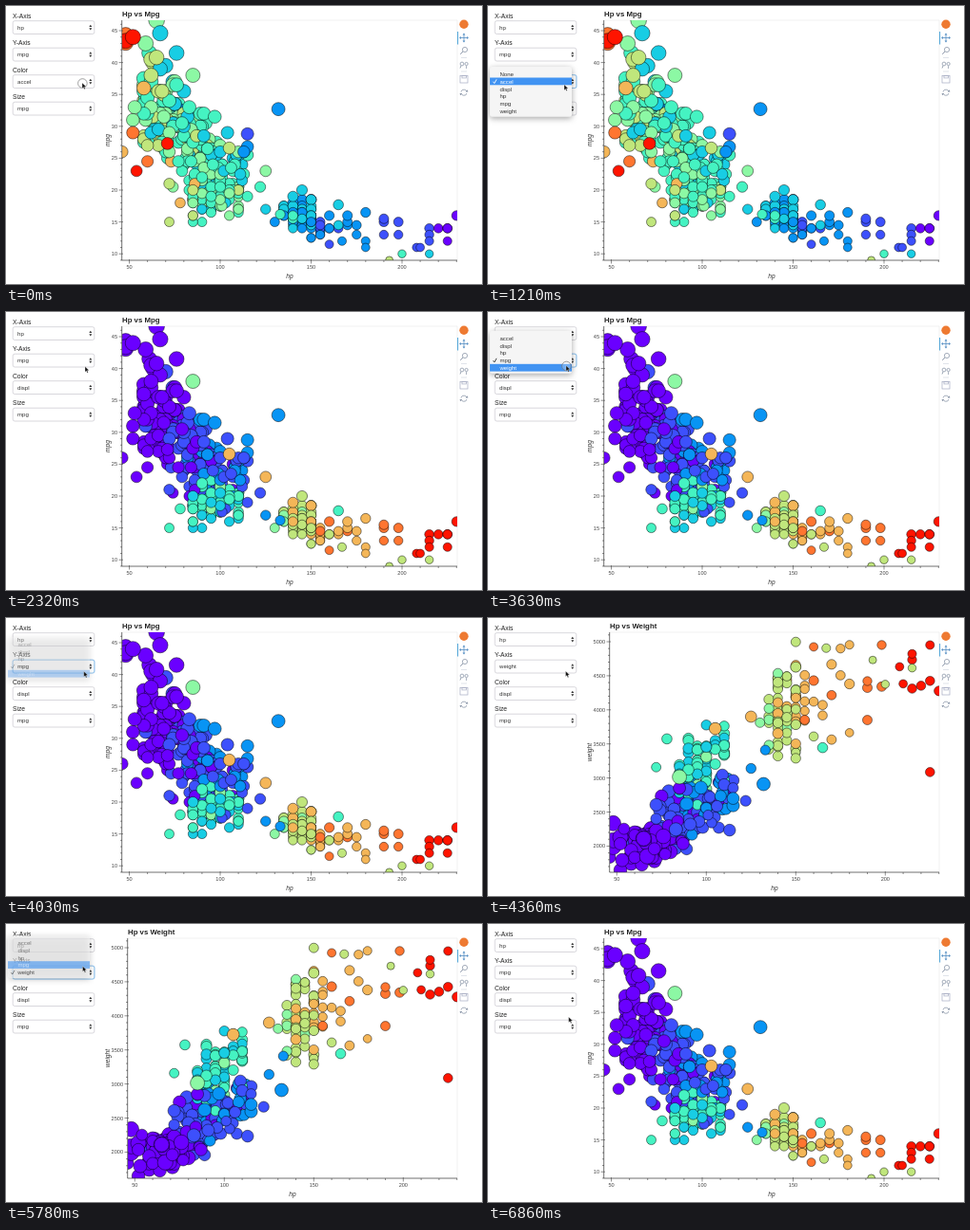
These frames come from a looping animation (500 px wide and 293 px high, 6.96 s). An HTML page with a canvas:

```html
<!DOCTYPE html>
<html lang="en">
<head>
<meta charset="utf-8">
<title>Scatter explorer</title>
<style>
html, body { margin: 0; width: 100%; height: 100%; overflow: hidden; background: #fff; }
canvas { display: block; width: 500px; height: 293px; }
</style>
</head>
<body>
<canvas id="stage"></canvas>
<script>
const W = 500, H = 293, LOOP = 6960;
const canvas = document.getElementById('stage');
const ratio = window.devicePixelRatio || 1;
canvas.width = W * ratio;
canvas.height = H * ratio;
const ctx = canvas.getContext('2d');
const SANS = '"Liberation Sans", Arial, sans-serif';
const FIELDS = ['accel', 'displ', 'hp', 'mpg', 'weight'];
const PALETTE = ['#6a00ff', '#3d50fc', '#0894f4', '#18cde4', '#45f3c2',
  '#8cf8a4', '#c0e67c', '#f4b658', '#ff7530', '#ff1400'];
const RANGE = { accel: [8, 24.8], displ: [68, 455] };
const clamp = (v, lo, hi) => Math.min(hi, Math.max(lo, v));

// ---- data ----
let seed = 20;
function random() {
  seed = (seed + 0x6d2b79f5) | 0;
  let n = Math.imul(seed ^ (seed >>> 15), 1 | seed);
  n = (n + Math.imul(n ^ (n >>> 7), 61 | n)) ^ n;
  return ((n ^ (n >>> 14)) >>> 0) / 4294967296;
}
const gauss = () => (random() + random() + random() - 1.5) * 2;

// Each measure is [mean, spread, slope per hp].
const clusters = [
  { n: 85, hp: [68, 6], lo: 58, hi: 80, step: 1, mpg: [32.5, 3.6, -.1], displ: [92, 9, .3], weight: [2040, 130, 8], accel: [17, 1.7, 0] },
  { n: 110, hp: [86, 8], lo: 70, hi: 105, step: 1, mpg: [27.5, 3.6, -.2], displ: [125, 18, .8], weight: [2420, 220, 12], accel: [16, 1.7, 0] },
  { n: 32, hp: [105, 9], lo: 90, hi: 122, step: 1, mpg: [23.5, 2.3, -.05], displ: [145, 19, 0], weight: [2700, 200, 8], accel: [14.5, 1.2, 0] },
  { n: 75, hp: [98, 9], lo: 85, hi: 110, step: 5, mpg: [19.3, 1.7, 0], displ: [235, 17, 0], weight: [3200, 240, 16], accel: [16.4, 1.4, 0] },
  { n: 66, hp: [145, 7], lo: 130, hi: 150, step: 5, mpg: [16, 1.5, -.08], displ: [322, 19, .8], weight: [3950, 310, 10], accel: [13, 1, 0] },
  { n: 14, hp: [165, 9], lo: 155, hi: 180, step: 5, mpg: [14, 1, 0], displ: [365, 20, 0], weight: [4250, 300, 0], accel: [11.5, .8, 0] }
];
// hp, mpg, displ, weight, accel
const loners = [
  [46, 26, 97, 1835, 20.5], [48, 43.1, 90, 1985, 21.5], [48, 44.3, 90, 2085, 21.7],
  [48, 43.4, 90, 2335, 23.7], [52, 44, 97, 2130, 24.6], [52, 31, 76, 1649, 16.5],
  [52, 29, 85, 2035, 22.2], [53, 33, 91, 1795, 17.4], [54, 23, 97, 2254, 23.5],
  [60, 24.5, 98, 2164, 22.1], [60, 27, 97, 1834, 19], [65, 46.6, 86, 2110, 17.9],
  [67, 44.6, 91, 1850, 13.8], [65, 40.8, 85, 2110, 19.2], [76, 41.5, 98, 2144, 14.7],
  [71, 27.3, 79, 1960, 24], [78, 18, 250, 3574, 21], [72, 15, 250, 3158, 19.5],
  [72, 21, 140, 2401, 19.5], [85, 38, 262, 3015, 17], [105, 26.6, 350, 3725, 19],
  [125, 23, 350, 3900, 17.4], [132, 32.7, 168, 2910, 11.4], [115, 28.8, 173, 2595, 11.3],
  [115, 26.8, 173, 2700, 12.9], [113, 26, 121, 2234, 12.5], [125, 17, 163, 3140, 13.6],
  [133, 16.2, 163, 3410, 15.8], [165, 17.7, 231, 3445, 13.4]
];
// hp, mpg, weight
const heavy = [
  [150, 15, 4997], [167, 12, 4906], [175, 13, 4900], [180, 12, 4955], [180, 11, 3664],
  [180, 16.5, 4380], [170, 15, 3563], [170, 16, 4668], [160, 14, 3609], [190, 15, 3850],
  [190, 15.5, 4325], [190, 13, 4422], [198, 15, 4341], [198, 13, 4952], [208, 11, 4633],
  [210, 11, 4382], [215, 14, 4312], [215, 13, 4735], [215, 12, 4821], [220, 14, 4354],
  [225, 14, 4425], [225, 14, 3086], [225, 12, 4951], [230, 16, 4278]
];

function makeCars() {
  const cars = [];
  for (const c of clusters) {
    for (let i = 0; i < c.n; i++) {
      const raw = clamp(c.hp[0] + gauss() * c.hp[1], c.lo, c.hi);
      const hp = Math.round(raw / c.step) * c.step;
      const value = ([mean, spread, slope]) => mean + gauss() * spread + slope * (hp - c.hp[0]);
      cars.push({
        hp, mpg: Math.round(value(c.mpg) * 2) / 2, displ: value(c.displ),
        weight: value(c.weight), accel: value(c.accel), order: random()
      });
    }
  }
  cars.sort((a, b) => a.order - b.order);
  for (const [hp, mpg, displ, weight, accel] of loners) cars.push({ hp, mpg, displ, weight, accel });
  for (const [hp, mpg, weight] of heavy) {
    cars.push({ hp, mpg, displ: hp * 2.02, weight, accel: 20.5 - hp * .05 });
  }
  // low-output giants
  cars.push({ hp: 193, mpg: 9, displ: 304, weight: 4732, accel: 18.5 });
  cars.push({ hp: 200, mpg: 10, displ: 307, weight: 4376, accel: 15 });
  cars.push({ hp: 215, mpg: 10, displ: 318, weight: 4615, accel: 14 });
  return cars;
}
const cars = makeCars();

function colorOf(car, field) {
  const [lo, hi] = RANGE[field];
  return PALETTE[clamp(Math.floor((car[field] - lo) / (hi - lo) * 10), 0, 9)];
}
const radiusOf = car => 4 + 4.3 * Math.pow(clamp((car.mpg - 9) / 37.6, 0, 1), .8);

// ---- drawing helpers ----
function text(str, x, y, size, color = '#333', align = 'left', style = '') {
  ctx.font = `${style} ${size}px ${SANS}`;
  ctx.textAlign = align;
  ctx.fillStyle = color;
  ctx.fillText(str, x, y);
}
function line(color, width, ...points) {
  ctx.beginPath();
  points.forEach(([x, y], i) => i ? ctx.lineTo(x, y) : ctx.moveTo(x, y));
  ctx.strokeStyle = color;
  ctx.lineWidth = width;
  ctx.stroke();
}
function shape(color, ...points) {
  ctx.beginPath();
  points.forEach(([x, y]) => ctx.lineTo(x, y));
  ctx.closePath();
  ctx.fillStyle = color;
  ctx.fill();
}
function disc(x, y, r, fill, stroke, width) {
  ctx.beginPath();
  ctx.arc(x, y, r, 0, Math.PI * 2);
  if (fill) { ctx.fillStyle = fill; ctx.fill(); }
  if (stroke) { ctx.strokeStyle = stroke; ctx.lineWidth = width; ctx.stroke(); }
}
function roundBox(x, y, w, h, r) {
  ctx.beginPath();
  ctx.roundRect(x, y, w, h, r);
}

// ---- plot ----
const RIGHT = 474, TOP = 15, BOTTOM = 268;
const views = {
  mpg: { left: 122, x50: 129.5, xScale: 1.91, base: 45, yBase: 26, yScale: 6.72, lo: 9, hi: 46, minor: 1, major: 5, title: 'Hp vs Mpg', mid: 298 },
  weight: { left: 128, x50: 135.3, xScale: 1.88, base: 5000, yBase: 25, yScale: .0718, lo: 1700, hi: 5100, minor: 100, major: 500, title: 'Hp vs Weight', mid: 301 }
};

function drawPlot(yField, colorField) {
  const v = views[yField];
  const px = hp => v.x50 + (hp - 50) * v.xScale;
  const py = value => v.yBase + (v.base - value) * v.yScale;
  text(v.title, v.left, 10.5, 7.8, '#222', 'left', 'bold');
  line('#e8e8e8', .6, [v.left, TOP], [RIGHT, TOP], [RIGHT, BOTTOM]);

  ctx.save();
  ctx.beginPath();
  ctx.rect(v.left, TOP, RIGHT - v.left, BOTTOM - TOP);
  ctx.clip();
  for (const car of cars) {
    disc(px(car.hp), py(car[yField]), radiusOf(car), colorOf(car, colorField), 'rgba(0,0,0,.8)', .6);
  }
  ctx.restore();

  line('#333', .7, [v.left - .3, TOP], [v.left - .3, BOTTOM], [RIGHT, BOTTOM]);
  for (let hp = 50; hp <= 230; hp += 10) {
    const major = hp % 50 === 0;
    line('#444', .6, [px(hp), BOTTOM - (major ? 1 : 0)], [px(hp), BOTTOM + (major ? 3.5 : 2)]);
    if (major) text(hp, px(hp), 277, 5.6, '#444', 'center');
  }
  for (let value = v.lo; value <= v.hi; value += v.minor) {
    const major = value % v.major === 0;
    const y = py(value);
    line('#444', .6, [v.left - (major ? 3.5 : 2), y], [v.left + (major ? 1 : 0), y]);
    if (major) text(value, v.left - 5, y + 2, 5.6, '#444', 'right');
  }
  text('hp', v.mid, 286.7, 6.6, '#333', 'center', 'italic');
  ctx.save();
  ctx.translate(108.5, 141.5);
  ctx.rotate(-Math.PI / 2);
  text(yField, 0, 0, 6.6, '#333', 'center', 'italic');
  ctx.restore();
}

function drawToolbar() {
  const x = 481, gray = '#8d98aa';
  disc(x, 19.3, 4.7, '#ee7a32');
  line('#4aa3d8', 1, [474.6, 27], [474.6, 40.5]);
  line('#5a91c4', .8, [x - 4, 33.5], [x + 4, 33.5]);
  line('#5a91c4', .8, [x, 29.5], [x, 37.5]);
  for (let i = 0; i < 4; i++) {
    ctx.save();
    ctx.translate(x, 33.5);
    ctx.rotate(i * Math.PI / 2);
    shape('#5a91c4', [5, 0], [3, -1.4], [3, 1.4]);
    ctx.restore();
  }
  disc(x + 1, 46, 2.6, null, gray, .8);
  line(gray, 1, [x - 1, 48], [x - 3.8, 50.8]);
  line('#ccd2dc', .6, [x - 3, 54.5], [x + 3, 54.5]);
  disc(x - 2, 61, 1.9, null, gray, .8);
  line(gray, .9, [x - 3, 63], [x - 4, 65.5]);
  disc(x + 2.6, 61, 1.6, null, gray, .8);
  line(gray, .8, [x + 2.6, 63], [x + 2.6, 66]);
  line('#ccd2dc', .6, [x - 3, 69], [x + 3, 69]);
  ctx.strokeStyle = '#a5abc2';
  ctx.lineWidth = .7;
  ctx.strokeRect(x - 4, 73.5, 8, 7.5);
  ctx.strokeRect(x - 2, 73.5, 4.5, 2.4);
  for (const turn of [0, Math.PI]) {
    ctx.save();
    ctx.translate(x, 91.2);
    ctx.rotate(turn);
    ctx.beginPath();
    ctx.arc(0, 0, 3.1, Math.PI * 1.08, Math.PI * 1.9);
    ctx.strokeStyle = gray;
    ctx.lineWidth = .8;
    ctx.stroke();
    shape(gray, [1.7, -.7], [4.4, -.7], [3.8, -3]);
    ctx.restore();
  }
}

// ---- controls ----
const boxTop = i => 15.7 + i * 28.5;
const ROW = 7.8;
const menus = [
  { box: 2, from: 'accel', to: 'displ', items: ['None', ...FIELDS], open: 890, hover: 1290, pick: 1570 },
  { box: 1, from: 'mpg', to: 'weight', items: FIELDS, open: 2650, hover: 3090, pick: 3630 },
  { box: 1, from: 'weight', to: 'mpg', items: FIELDS, open: 4500, hover: 5210, pick: 5480 }
];
const menuAlpha = (m, t) => t < m.open ? 0 : clamp(1 - (t - m.pick - 150) / 380, 0, 1);

function drawSelect(i, label, value, focused) {
  const y = boxTop(i);
  text(label, 7, y - 3.2, 6.7, '#222');
  if (focused) {
    roundBox(6.3, y - .8, 87.4, 15.2, 2.5);
    ctx.fillStyle = 'rgba(90,165,235,.25)';
    ctx.fill();
  }
  roundBox(7.2, y, 85.6, 13.8, 2);
  ctx.fillStyle = '#fff';
  ctx.fill();
  ctx.strokeStyle = focused ? '#7db8e8' : '#cfcdd3';
  ctx.lineWidth = .8;
  ctx.stroke();
  text(value, 12, y + 9, 6.1, '#333');
  shape('#333', [87.3, y + 6.2], [90.3, y + 6.2], [88.8, y + 4]);
  shape('#333', [87.3, y + 7.5], [90.3, y + 7.5], [88.8, y + 9.7]);
}

function drawMenu(m, t) {
  const alpha = menuAlpha(m, t);
  if (!alpha) return;
  const chosen = m.items.indexOf(m.from);
  const first = boxTop(m.box) + 3 - chosen * ROW;
  const blink = t >= m.pick + 70 && t < m.pick + 130;
  const lit = blink ? -1 : m.items.indexOf(t < m.hover ? m.from : m.to);
  ctx.save();
  ctx.globalAlpha = alpha;
  ctx.shadowColor = 'rgba(0,0,0,.35)';
  ctx.shadowBlur = 6 * ratio;
  ctx.shadowOffsetY = 1.8 * ratio;
  roundBox(2, first - 4, 86, m.items.length * ROW + 6, 2.5);
  ctx.fillStyle = '#f5f5f5';
  ctx.fill();
  ctx.shadowColor = 'transparent';
  m.items.forEach((item, i) => {
    const y = first + i * ROW;
    if (i === lit) {
      ctx.fillStyle = '#4193f2';
      ctx.fillRect(2, y - .2, 86, ROW);
    }
    const ink = i === lit ? '#fff' : '#333';
    text(item, 12.4, y + 6, 6.1, ink);
    if (i === chosen) line(ink, .9, [5.4, y + 4], [6.7, y + 5.8], [9, y + 1.6]);
  });
  ctx.restore();
}

// ---- pointer: time, x, y ----
const path = [
  [0, 80, 81], [1180, 80, 81], [1330, 80, 90], [1640, 80, 90], [1870, 75.5, 72],
  [2180, 83, 57.5], [2990, 83, 57.5], [3390, 82, 56.5], [3900, 82, 56.5], [4150, 81.5, 56],
  [4740, 81.5, 56], [4880, 81.5, 51], [5090, 81.5, 51], [5300, 81, 45], [5700, 80.5, 44.5],
  [5780, 80.5, 44.5], [6010, 81, 46], [6720, 81, 46], [6860, 84.7, 98], [LOOP, 84.7, 98]
];
const clicks = [[0, 50], [350, 470], [1570, 1640], [3630, 3680], [5480, 5540]];

function drawPointer(t) {
  const i = Math.max(1, path.findIndex(p => p[0] > t));
  const [t0, x0, y0] = path[i - 1], [t1, x1, y1] = path[i];
  const k = (t - t0) / (t1 - t0);
  const x = x0 + (x1 - x0) * k, y = y0 + (y1 - y0) * k;
  if (clicks.some(([from, to]) => t >= from && t < to)) {
    disc(x + .4, y + .5, 4.8, 'rgba(255,255,255,.25)', '#777', .7);
  }
  ctx.save();
  ctx.translate(x, y);
  const arrow = [[0, 0], [0, 5.8], [1.4, 4.6], [2.3, 6.7], [3.3, 6.2], [2.4, 4.2], [4.2, 4.1]];
  shape('#111', ...arrow);
  line('rgba(255,255,255,.8)', .4, ...arrow, arrow[0]);
  ctx.restore();
}

function draw(t) {
  ctx.setTransform(ratio, 0, 0, ratio, 0, 0);
  ctx.fillStyle = '#fff';
  ctx.fillRect(0, 0, W, H);
  drawPlot(t >= 4360 && t < 6180 ? 'weight' : 'mpg', t < 2320 ? 'accel' : 'displ');
  drawToolbar();

  const values = ['hp', 'mpg', 'accel', 'mpg'];
  for (const m of menus) if (t >= m.pick + 530) values[m.box] = m.to;
  ['X-Axis', 'Y-Axis', 'Color', 'Size'].forEach((label, i) => {
    drawSelect(i, label, values[i], menus.some(m => m.box === i && menuAlpha(m, t) > 0));
  });
  menus.forEach(m => drawMenu(m, t));
  drawPointer(t);
}

const start = performance.now();
function tick() {
  draw((performance.now() - start) % LOOP);
  requestAnimationFrame(tick);
}
draw(0);
requestAnimationFrame(tick);
</script>
</body>
</html>
```
